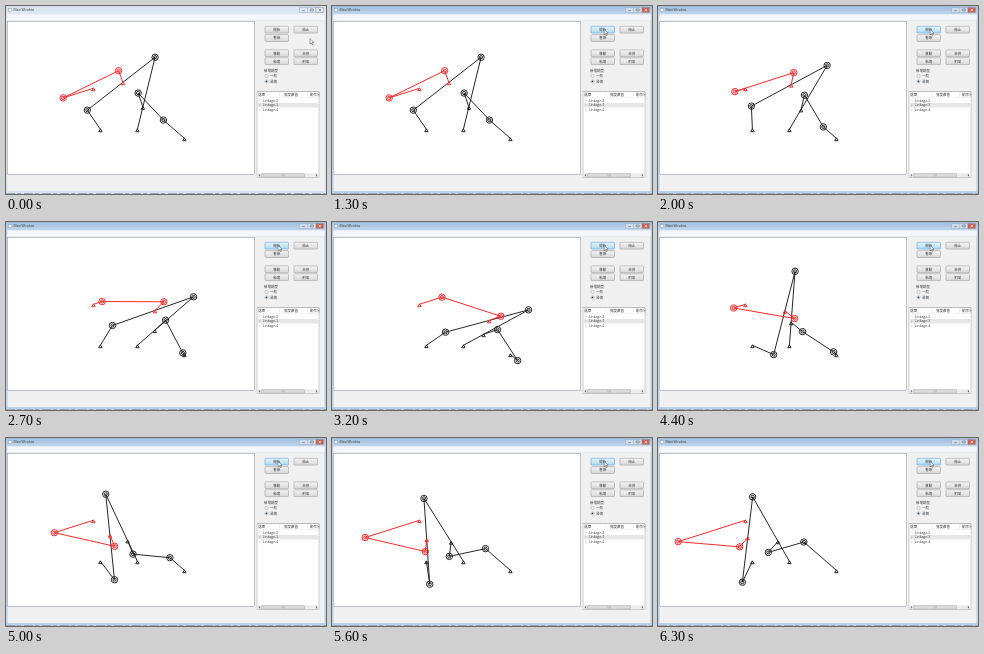
Write an HTML page that moves like this. It is 320 px wide and 188 px high and loops after 8 s.

```html
<!DOCTYPE html>
<html lang="zh-Hant">
<head>
<meta charset="utf-8">
<title>Linkage simulator</title>
<style>
html, body { margin: 0; width: 100%; height: 100%; overflow: hidden; background: #f0f0f0; }
svg { display: block; width: 100vw; height: 100vh; }
text { font: 3.5px "Noto Sans CJK TC", "Noto Sans CJK", "Open Sans", sans-serif; fill: #3a3a3a; }
.latin { font: 3.4px "Open Sans", sans-serif; }
.mech { fill: none; stroke-width: 1; stroke-linejoin: round; }
</style>
</head>
<body>
<svg viewBox="0 0 320 188">
  <defs>
    <linearGradient id="idle" x1="0" x2="0" y1="0" y2="1">
      <stop offset="0" stop-color="#d3dfeb"/><stop offset="1" stop-color="#e2ebf4"/>
    </linearGradient>
    <linearGradient id="active" x1="0" x2="0" y1="0" y2="1">
      <stop offset="0" stop-color="#9dbcdc"/><stop offset="1" stop-color="#c3d8ee"/>
    </linearGradient>
    <linearGradient id="btn" x1="0" x2="0" y1="0" y2="1">
      <stop offset="0" stop-color="#f5f5f5"/><stop offset="1" stop-color="#d6d6d6"/>
    </linearGradient>
    <linearGradient id="hot" x1="0" x2="0" y1="0" y2="1">
      <stop offset="0" stop-color="#e6f5fd"/><stop offset="1" stop-color="#a8d8f2"/>
    </linearGradient>
  </defs>

  <rect id="frame" width="320" height="188"/>
  <rect id="bar" width="320" height="8.500"/>
  <rect x="2.500" y="2.500" width="3" height="3" fill="#f4f8fc" stroke="#8fa0b2" stroke-width=".5"/>
  <text class="latin" x="7.500" y="5.400">MainWindow</text>
  <path d="M293.500 1.500h16.500v5h-16.500zM301.500 1.500v5" fill="#dfe8f1" fill-opacity=".6" stroke="#9aabbd" stroke-width=".5"/>
  <rect id="close" x="310" y="1.500" width="7.500" height="5" stroke="#9a8f93" stroke-width=".5"/>
  <path d="M296 4.700h3M304.200 3h3v2h-3z" fill="none" stroke="#65727f" stroke-width=".6"/>
  <path id="cross" d="M312.700 3l2.200 2.200M314.900 3l-2.200 2.200" stroke-width=".7"/>

  <rect x="1.500" y="8.500" width="317" height="176.500" fill="#f0f0f0"/>
  <rect x="1.500" y="8.500" width="317" height="6" fill="#f4f6fa"/>
  <path d="M1.500 14.500h317" stroke="#e2e4e8" stroke-width=".6"/>
  <rect x="1.500" y="15.500" width="247" height="153" fill="#fff" stroke="#a9adb3" stroke-width=".7"/>
  <path d="M0 187.500h320" stroke="#98a3ae" stroke-width=".9" stroke-dasharray="9 2 4 3"/>

  <g id="buttons"></g>

  <text x="258" y="65.500">新增類型</text>
  <g fill="#fff" stroke="#999" stroke-width=".5">
    <circle cx="260.500" cy="70" r="1.600"/><circle cx="260.500" cy="75.400" r="1.600"/>
  </g>
  <circle cx="260.500" cy="75.400" r=".9" fill="#345"/>
  <text x="264" y="71.300">一般</text>
  <text x="264" y="76.700">滑塊</text>

  <svg x="250.500" y="85" width="63" height="87" viewBox="250.500 85 63 87">
    <rect x="250.900" y="85.400" width="62.200" height="86.200" fill="#fff" stroke="#a0a4aa" stroke-width=".7"/>
    <path d="M251.300 91.400h61.400M273.500 86v5M301.500 86v5" stroke="#e4e4e4" stroke-width=".5"/>
    <text x="252.300" y="89.900">選單</text>
    <text x="278" y="89.900">寬度數值</text>
    <text x="304" y="89.900">動作分類</text>
    <rect x="251.300" y="97" width="61.400" height="4.500" fill="#e6e6e6"/>
    <g class="rows"></g>
    <rect x="251.300" y="167.300" width="61.400" height="4" fill="#ececec"/>
    <rect x="255.500" y="167.600" width="43" height="3.400" rx=".6" fill="#dcdcdc" stroke="#a5a5a5" stroke-width=".5"/>
    <path d="M253.900 168.200l-1.200 1.100l1.200 1.100zM310 168.200l1.200 1.100l-1.200 1.100zM276 168.300v2M277.200 168.300v2M278.400 168.300v2" fill="#555" stroke="#777" stroke-width=".3"/>
  </svg>

  <g transform="translate(.4 .3)">
    <path id="black" class="mech" stroke="#262626"/>
    <path id="red" class="mech" stroke="#f42a2c"/>
  </g>
  <path id="cursor" d="M0 0v5.300l1.300-1.200l.9 2l.9-.4l-.9-1.900h1.700z" fill="#fff" stroke="#444" stroke-width=".5"/>
</svg>

<script>
const LOOP = 8000, STEP = 100, RAD = Math.PI / 180;
const $ = s => document.querySelector(s);

const buttons = [
  ['開始', 259, 20.3], ['停止', 288, 20.3], ['暫停', 259, 28.7],
  ['移動', 259, 43.9], ['合併', 288, 43.9], ['新增', 259, 51.8], ['附加', 288, 51.8]
];
$('#buttons').innerHTML = buttons.map(([label, x, y]) =>
  `<rect x="${x}" y="${y}" width="23.500" height="6.800" rx=".8" stroke-width=".6"/>
   <text x="${x + 11.75}" y="${y + 4.7}" text-anchor="middle">${label}</text>`).join('');
const faces = document.querySelectorAll('#buttons rect');

$('.rows').innerHTML = [2, 3, 4].map((n, i) =>
  `<path d="M253.200 ${93.2 + i * 4.9}l1.200 1l-1.200 1" fill="none" stroke="#aaa" stroke-width=".5"/>
   <text class="latin" x="257" y="${95.5 + i * 4.9}">Linkage-${n}</text>`).join('');

const add = (p, q, k = 1) => [p[0] + q[0] * k, p[1] + q[1] * k];
const sub = (p, q) => add(p, q, -1);
const dot = (p, q) => p[0] * q[0] + p[1] * q[1];
const polar = deg => [Math.cos(deg * RAD), Math.sin(deg * RAD)];
const mix = (p, q, k) => add(p, sub(q, p), k);

// Intersection of circles (p, r) and (q, s), upper side
function dyad(p, r, q, s) {
  const v = sub(q, p), d = Math.hypot(...v), u = [v[0] / d, v[1] / d];
  const a = (r * r - s * s + d * d) / (2 * d);
  const h = Math.sqrt(Math.max(0, r * r - a * a));
  return add(add(p, u, a), [u[1], -u[0]], h);
}

// Point on the line (o, dir) at distance len from p, forward side
function slide(o, dir, p, len) {
  const v = sub(p, o), along = dot(v, dir);
  const off2 = dot(v, v) - along * along;
  return add(o, dir, along + Math.sqrt(Math.max(0, len * len - off2)));
}

const fmt = p => p.map(n => n.toFixed(2)).join(' ');
const poly = (...pts) => 'M' + pts.map(fmt).join('L');
const ring = (p, r) => `M${fmt([p[0] - r, p[1]])}a${r} ${r} 0 1 0 ${2 * r} 0a${r} ${r} 0 1 0 ${-2 * r} 0`;
const joint = p => ring(p, 3.2) + ring(p, 1.6);
const base = p => `M${fmt([p[0], p[1] - .5])}l-1.700 2.900h3.400z`;

const A = [94, 123], B = [131, 123];
const rail = { black: [[178, 132], polar(41)], red: [[87, 82], polar(162.4)] };

function slider(id, pivot, angle, crank, rod) {
  const [o, dir] = rail[id];
  const tip = add(pivot, polar(angle), crank);
  const end = slide(o, dir, tip, rod);
  return poly(pivot, tip, end, o) + joint(tip) + joint(end) + base(pivot) + base(o);
}

function drawMechanism(t) {
  const angle = Math.max(-124.4, -92.5 + 4.84 * (Math.min(t, 6300) - 2000) / STEP);
  const c = add(A, polar(angle), 23.2);
  const d = dyad(c, 86, B, 74.2);
  $('#black').setAttribute('d',
    poly(A, c, d, B) + joint(c) + joint(d) + base(A) + base(B) +
    slider('black', mix(B, d, .31), angle + 15.5, 14.7, 37));
  $('#red').setAttribute('d', slider('red', mix(c, d, .525), angle + 14.5, 12.4, 61.8));
}

// The window gains focus when the start button is pressed
function drawWindow(t) {
  const on = t >= 1300;
  $('#frame').setAttribute('fill', on ? '#b9d1ea' : '#d7e4f1');
  $('#bar').setAttribute('fill', on ? 'url(#active)' : 'url(#idle)');
  $('#close').setAttribute('fill', on ? '#c9624f' : '#dfe6ee');
  $('#cross').setAttribute('stroke', on ? '#fff' : '#65727f');
}

function drawCursor(t) {
  const go = Math.min(1, t / 400), near = Math.min(1, Math.max(0, (t - 500) / 400));
  const p = mix(mix([304, 32.7], [277, 22.5], go), [272.2, 23.5], near);
  $('#cursor').setAttribute('transform', `translate(${fmt(p)})`);
  buttons.forEach(([, x, y], i) => {
    const over = p[0] >= x && p[0] <= x + 23.5 && p[1] >= y && p[1] <= y + 7;
    faces[i].setAttribute('fill', over ? 'url(#hot)' : 'url(#btn)');
    faces[i].setAttribute('stroke', over ? '#6aa5cb' : '#a0a0a0');
  });
}

function draw(now) {
  const t = Math.floor((now % LOOP) / STEP) * STEP;
  drawMechanism(t);
  drawWindow(t);
  drawCursor(t);
}

let start;
function tick(now) {
  start ??= now;
  draw(now - start);
  requestAnimationFrame(tick);
}
draw(0);
requestAnimationFrame(tick);
</script>
</body>
</html>
```
